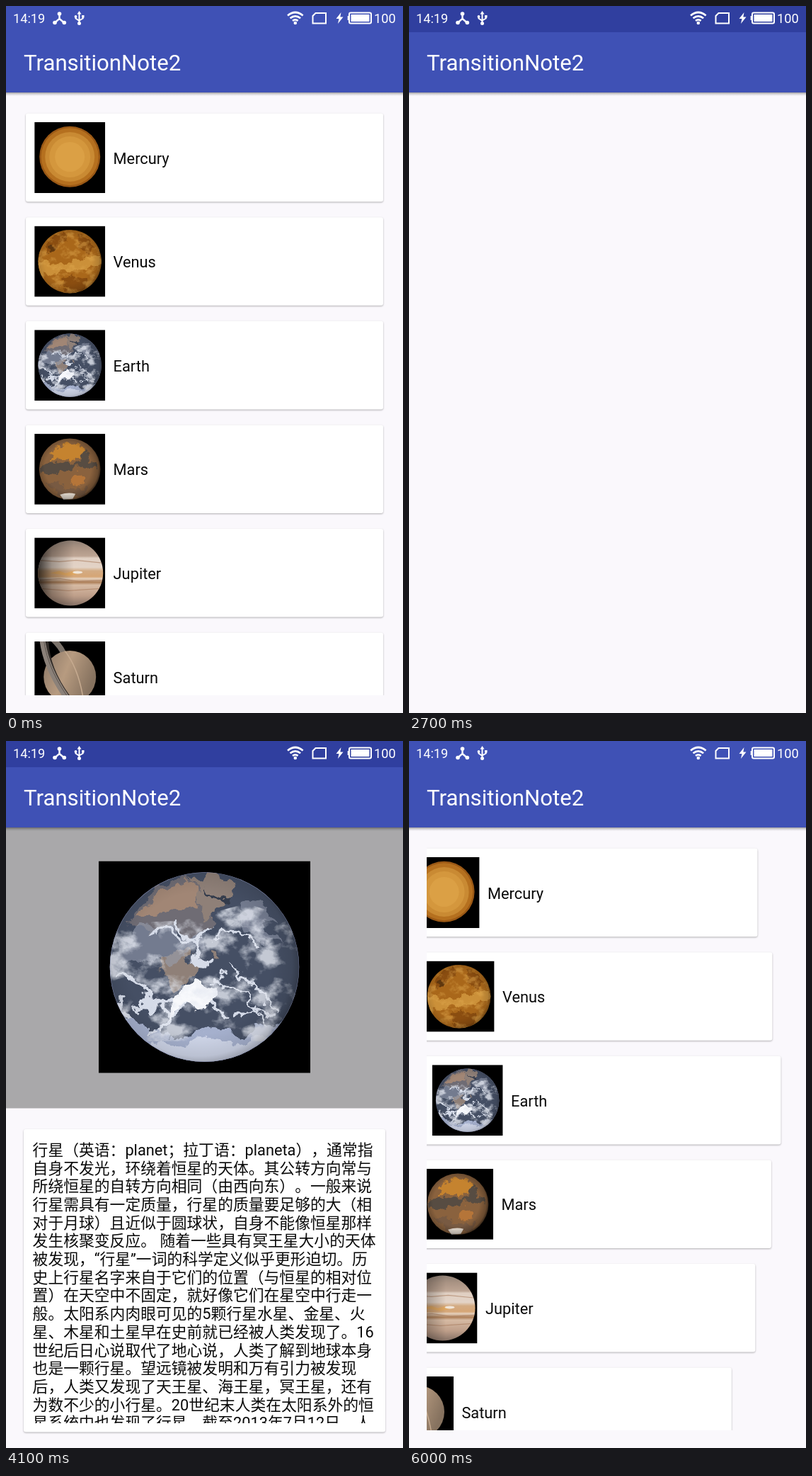
An HTML page for the animation above (6100 ms loop, 561 by 998 pixels).

```html
<!DOCTYPE html>
<html lang="zh-CN">
<head>
<meta charset="utf-8">
<title>TransitionNote2</title>
<style>
  html, body { margin: 0; width: 100%; height: 100%; overflow: hidden; background: #faf8fc; }
  #stage { display: block; width: 561px; height: 998px; }
  text { font-family: Roboto, "Noto Sans CJK SC", "Noto Sans CJK", sans-serif; white-space: pre; text-spacing-trim: space-all; }
  .card { fill: #fff; filter: drop-shadow(0 1.8px 1.2px rgba(0, 0, 0, .3)); }
  .label { font-size: 21.8px; fill: #0a0a0a; }
  .light { fill: #fff; }
</style>
</head>
<body>
<svg id="stage" viewBox="0 0 561 998">
  <defs>
    <clipPath id="listClip"><rect x="25" y="122" width="511" height="851"/></clipPath>
    <clipPath id="textClip"><rect x="25" y="558" width="511" height="402.600"/></clipPath>
    <clipPath id="disc"><circle cx="50" cy="50" r="44.7"/></clipPath>
    <clipPath id="wide"><circle cx="51" cy="50" r="46"/></clipPath>
    <clipPath id="globe"><circle cx="50" cy="50" r="37"/></clipPath>
    <linearGradient id="barShade" x2="0" y2="1">
      <stop stop-opacity=".38"/><stop offset=".4" stop-opacity=".16"/><stop offset="1" stop-opacity="0"/>
    </linearGradient>
    <radialGradient id="round" cx=".47" cy=".48" r=".53">
      <stop offset=".7" stop-opacity="0"/><stop offset=".92" stop-opacity=".25"/><stop offset="1" stop-opacity=".65"/>
    </radialGradient>
    <linearGradient id="night">
      <stop stop-opacity=".75"/><stop offset=".22" stop-opacity=".3"/><stop offset=".55" stop-opacity="0"/>
    </linearGradient>
    <linearGradient id="bands" x2="0" y2="1">
      <stop stop-color="#85786f"/><stop offset=".14" stop-color="#a99383"/><stop offset=".26" stop-color="#bda493"/>
      <stop offset=".29" stop-color="#e0cfc2"/><stop offset=".42" stop-color="#e3d3c6"/><stop offset=".47" stop-color="#d3ab83"/>
      <stop offset=".55" stop-color="#d6a676"/><stop offset=".58" stop-color="#e4cfbb"/><stop offset=".63" stop-color="#ae8059"/>
      <stop offset=".67" stop-color="#d6baa3"/><stop offset=".82" stop-color="#bf9f8a"/><stop offset="1" stop-color="#75645b"/>
    </linearGradient>
    <linearGradient id="ball" x2="1" y2=".4">
      <stop stop-color="#8a7767"/><stop offset=".5" stop-color="#b79b80"/><stop offset="1" stop-color="#86725f"/>
    </linearGradient>
    <!-- Frays the edges of flat shapes. -->
    <filter id="fray" x="-10%" y="-10%" width="120%" height="120%" color-interpolation-filters="sRGB">
      <feTurbulence type="fractalNoise" baseFrequency=".11" numOctaves="4" seed="4"/>
      <feDisplacementMap in="SourceGraphic" scale="13" xChannelSelector="R" yChannelSelector="G"/>
    </filter>
    <!-- Breaks a fill into soft flecks of its own colour. -->
    <filter id="flecks" x="0" y="0" width="100%" height="100%" color-interpolation-filters="sRGB">
      <feTurbulence type="fractalNoise" baseFrequency=".07 .09" numOctaves="5" seed="7"/>
      <feColorMatrix values="0 0 0 0 0  0 0 0 0 0  0 0 0 0 0  5 0 0 0 -2.400" result="holes"/>
      <feComposite in="SourceGraphic" in2="holes" operator="in"/>
    </filter>

    <symbol id="mercury" viewBox="0 0 100 100">
      <rect width="100" height="100"/>
      <circle cx="50" cy="48.7" r="43" fill="#9a5815"/><circle cx="50" cy="48.7" r="40.5" fill="#b5701f"/>
      <circle cx="50" cy="49" r="35" fill="#c98a33"/><circle cx="50" cy="49" r="29" fill="#d4973d"/>
      <circle cx="50" cy="49" r="21" fill="#dba045"/>
    </symbol>

    <symbol id="venus" viewBox="0 0 100 100">
      <rect width="100" height="100"/>
      <g clip-path="url(#disc)">
        <rect width="100" height="100" fill="#a9671a"/>
        <g filter="url(#fray)">
          <path d="M14 28q10-16 28-17l6 8-14 5-4 11-12 4zM60 12l15 5 9 15-10 6-12-9zM38 78l14-8 24 6-6 16-24 4z" fill="#8a4d10"/>
          <path d="M5 48l12 2 9 4 10-3 11 4 6-9 13 4 9-9 10 3 8-3 1 15-13-1-9 7-13-2-9 6-12-5-9 7-14-3-5 6-14-9z" fill="#cb9039"/>
          <path d="M18 32l8-4 4 6-7 4z" fill="#5f370e"/>
        </g>
        <rect width="100" height="100" fill="#dda64d" opacity=".5" filter="url(#flecks)"/>
        <circle cx="50" cy="50" r="45" fill="url(#round)" opacity=".5"/>
      </g>
    </symbol>

    <symbol id="earth" viewBox="0 0 100 100">
      <rect width="100" height="100"/>
      <g clip-path="url(#disc)">
        <rect width="100" height="100" fill="#454f64"/>
        <g filter="url(#fray)">
          <path d="M13 29q8-15 24-20l11 2 6 12-2 8-8 5-9-6-12 5z" fill="#6f6c74"/>
          <path d="M17 25q10-12 27-14l4 5-2 5-13 2-10 4z" fill="#a18675"/>
          <path d="M43 9q12-5 22 3l-4 5-9 1zM47 15l12 4-2 7-9 1zM29 46l10-4 9 6-4 10-8 3-6-7zM56 40l3 1-1 7-3-2z" fill="#8f8078"/>
          <path d="M50 11l5 5 7 2-1 2-8-3z" fill="#343c4c"/>
          <path d="M8 36l12-5 8 3 8-5 7 2-6 5 9-1 5 6-9 2-5 5-8-3-7 5-9-2-7 6zM65 23l12-4 7 11-8-2 9 11-13-6z" fill="#9aa1b2" opacity=".55"/>
          <g fill="none" stroke="#d5dbe8" stroke-linecap="round">
            <path d="M24 34q8-6 14 1t12-3M38 28q6 8 7 15t8 4" stroke-width="2"/>
            <path d="M8 54q12 2 18 13t18 1q10-3 14 5M10 66q-1 12 8 15t14-7-7-8-6 5" stroke-width="2"/>
            <path d="M55 56q13 2 18 11t10 11M62 51q16 5 21 20M64 73q9-7 18 1M55 37q9-7 21 1" stroke-width="1.2"/>
          </g>
          <path d="M39 63l8-6 10 2 2 5-8 6-14 1-7 4 3-8z" fill="#f8f9fc"/>
          <path d="M5 76l18 3 12 5 17-5 15 3 22-6v25H5z" fill="#a5b0cd"/>
          <path d="M23 85l15 3 13-5 16 3 12-2v16H23z" fill="#cfd6e9"/>
        </g>
        <path d="M0 30l40-2 30-8 30 10v55H0z" fill="#e4e8f1" opacity=".8" filter="url(#flecks)"/>
        <circle cx="50" cy="50" r="45" fill="none" stroke="#a4addb" stroke-width=".9" opacity=".75"/>
        <circle cx="50" cy="50" r="45" fill="url(#round)" opacity=".4"/>
      </g>
    </symbol>

    <symbol id="mars" viewBox="0 0 100 100">
      <rect width="100" height="100"/>
      <g clip-path="url(#disc)">
        <circle cx="50" cy="50" r="43.3" fill="#8a623e"/>
        <g filter="url(#fray)">
          <path d="M24 28q10-14 28-16 14 2 19 14l-7 9-14 3-15-3-10 4z" fill="#c5832f"/>
          <path d="M10 44l10-4 15 2 13-1 8 3 9-7 4-12 7 2 1 12 8 3 2 8-8-2-8 3-8-6-11 6-16 1-9 7-12-3-8 2z" fill="#574c42"/>
          <path d="M50 64q6-9 15-8 8 3 7 11l-9 6-11-2z" fill="#b57539"/>
          <path d="M16 68l14-1 11 8 11 3 18-1 10-4-11 14-31 3z" fill="#785a42"/>
        </g>
        <path d="M36 86q12-4 22-1l-4 7-13 1z" fill="#f0e6da"/>
        <circle cx="50" cy="50" r="44" fill="url(#round)"/>
      </g>
    </symbol>

    <symbol id="jupiter" viewBox="0 0 100 100">
      <rect width="100" height="100"/>
      <g clip-path="url(#wide)">
        <rect width="100" height="100" fill="url(#bands)"/>
        <path d="M5 32l30 2 24-2 40 4M6 60l30-2 27 4 35-2M8 72l40 3 45-3" fill="none" stroke="#a77b5c" stroke-width="1.2" opacity=".6"/>
        <path d="M22 50l13-3 9 3 12-3 8 4-16 3-12-2z" fill="#dfa864"/>
        <ellipse cx="61" cy="49" rx="7" ry="2" fill="#f0e5d8"/>
        <circle cx="51" cy="50" r="47" fill="url(#night)"/>
      </g>
    </symbol>

    <symbol id="saturn" viewBox="0 0 100 100">
      <rect width="100" height="100"/>
      <g fill="none">
        <path d="M25-4Q36 5 43 20" stroke="#7a7169" stroke-width="8"/>
        <circle cx="50" cy="50" r="37" fill="url(#ball)"/>
        <path d="M42 12q20 25 27 69" stroke="#c6ab90" stroke-width="1.5" clip-path="url(#globe)"/>
        <path d="M18-4Q18 42 58 90" stroke="#332d29" stroke-width="4"/>
        <path d="M11-4Q16 42 55 92" stroke="#8b8179" stroke-width="8"/>
        <path d="M13-4Q18 42 57 92" stroke="#5c544e" stroke-width="1"/>
      </g>
    </symbol>
  </defs>

  <rect width="561" height="998" fill="#faf8fc"/>
  <g id="list" clip-path="url(#listClip)"></g>

  <g id="photo">
    <rect y="122" width="561" height="398.800" fill="#a9a8aa"/>
    <use href="#earth" x="130.900" y="171.800" width="299.200" height="299.200"/>
  </g>
  <g id="note">
    <rect class="card" x="25" y="545.700" width="511" height="427.400" rx="3"/>
    <g id="lines" clip-path="url(#textClip)"></g>
  </g>

  <circle id="touch" cx="167.3" cy="536.3" r="17.3" fill="#fff" fill-opacity=".92" stroke="#cbd0e0" stroke-width="2"/>

  <rect y="122" width="561" height="5" fill="url(#barShade)"/>
  <rect width="561" height="122" fill="#3f51b5"/>
  <rect id="status" width="561" height="37" fill="#303f9f"/>
  <text class="light" x="25" y="91" font-size="31.2">TransitionNote2</text>
  <g class="light" font-size="18.2">
    <text x="10" y="23.5">14:19</text>
    <text x="520" y="23.5">100</text>
  </g>

  <g class="light">
    <circle cx="75.5" cy="11" r="2.8"/><circle cx="69" cy="23.5" r="2.8"/><circle cx="82.3" cy="23.5" r="2.8"/>
    <path d="M103.500 7l3 4.500h-6z"/><circle cx="103.500" cy="24.500" r="2.500"/>
    <circle cx="98.500" cy="15" r="1.900"/><path d="M107 13h3.500v3.500H107z"/>
    <circle cx="408.800" cy="24" r="2.300"/>
    <path d="M473.500 9l-7 9h4l-1.500 7 7.500-9.500h-4.200z"/>
    <rect x="487.500" y="12" width="26" height="10"/>
  </g>
  <g fill="none" stroke="#fff" stroke-width="2">
    <path stroke-width="2.4" d="M75.500 11v7L69 23.500M75.500 18l6.500 5.500"/>
    <path d="M103.500 11v12M98.500 15v2.500l5 3.500M108.700 16v1.500l-5.200 3"/>
    <path stroke-width="2.700" d="M398 13.500q10.800-9 21.600 0M401.500 17.300q7.300-6 14.600 0M405 20.900q3.800-3 7.600 0"/>
    <path d="M437.500 10H452v14.500h-18.500V14z"/>
    <rect x="485" y="9.500" width="31" height="15" rx="2"/>
    <path d="M483.700 14v6"/>
  </g>
</svg>

<script>
const LOOP = 6100, FRAME = 100;
const LIST_TIME = 750, NOTE_TIME = 600;
const WIDTH = 561, HEIGHT = 998;

// Delay grows with distance from the tapped card, as a share of LIST_TIME.
const planets = [
  ['Mercury', .153], ['Venus', .071], ['Earth', 0],
  ['Mars', .078], ['Jupiter', .163], ['Saturn', .255]
];

const article = `行星（英语：planet；拉丁语：planeta），通常指
自身不发光，环绕着恒星的天体。其公转方向常与
所绕恒星的自转方向相同（由西向东）。一般来说
行星需具有一定质量，行星的质量要足够的大（相
对于月球）且近似于圆球状，自身不能像恒星那样
发生核聚变反应。 随着一些具有冥王星大小的天体
被发现，“行星”一词的科学定义似乎更形迫切。历
史上行星名字来自于它们的位置（与恒星的相对位
置）在天空中不固定，就好像它们在星空中行走一
般。太阳系内肉眼可见的5颗行星水星、金星、火
星、木星和土星早在史前就已经被人类发现了。16
世纪后日心说取代了地心说，人类了解到地球本身
也是一颗行星。望远镜被发明和万有引力被发现
后，人类又发现了天王星、海王星，冥王星，还有
为数不少的小行星。20世纪末人类在太阳系外的恒
星系统中也发现了行星，截至2013年7月12日，人`;

const $ = id => document.getElementById(id);

function add(parent, tag, attrs, text = '') {
  const el = document.createElementNS('http://www.w3.org/2000/svg', tag);
  for (const key in attrs) el.setAttribute(key, attrs[key]);
  el.textContent = text;
  return parent.appendChild(el);
}

const rows = planets.map(([name, delay], i) => {
  const row = add($('list'), 'g', {});
  const y = 151.6 + i * 146.6;
  add(row, 'rect', { class: 'card', x: 28, y, width: 505, height: 124.6, rx: 3 });
  add(row, 'use', { href: '#' + name.toLowerCase(), x: 40.2, y: y + 12.4, width: 100, height: 100 });
  add(row, 'text', { class: 'label', x: 151.6, y: y + 70.9 }, name);
  return { row, delay };
});

article.split('\n').forEach((line, i) =>
  add($('lines'), 'text', { class: 'label', x: 37.6, y: 582.5 + i * 25.7 }, line));

const progress = (t, start, length) => Math.min(1, Math.max(0, (t - start) / length));
const leave = (t, start, length) => progress(t, start, length) ** 2;
const arrive = (t, start, length) => (1 - progress(t, start, length)) ** 2;
const move = (el, x, y) => el.setAttribute('transform', `translate(${x} ${y})`);
const show = (el, on) => el.setAttribute('visibility', on ? 'visible' : 'hidden');

function draw(t) {
  for (const { row, delay } of rows) {
    const away = t < 4000
      ? leave(t, 1510 - delay * LIST_TIME, LIST_TIME)
      : arrive(t, 5337 + delay * LIST_TIME, LIST_TIME);
    move(row, -WIDTH * away, 0);
  }
  const apart = HEIGHT * (t < 4000 ? arrive(t, 2866, NOTE_TIME) : leave(t, 4071, NOTE_TIME));
  move($('photo'), 0, -apart);
  move($('note'), 0, apart);
  show($('touch'), t >= 1200 && t < 1400);
  show($('status'), t >= 2700 && t < 5100);
}

let shown = -1;
function tick() {
  const t = Math.floor(performance.now() % LOOP / FRAME) * FRAME;
  if (t !== shown) draw(shown = t);
  requestAnimationFrame(tick);
}
tick();
</script>
</body>
</html>
```
